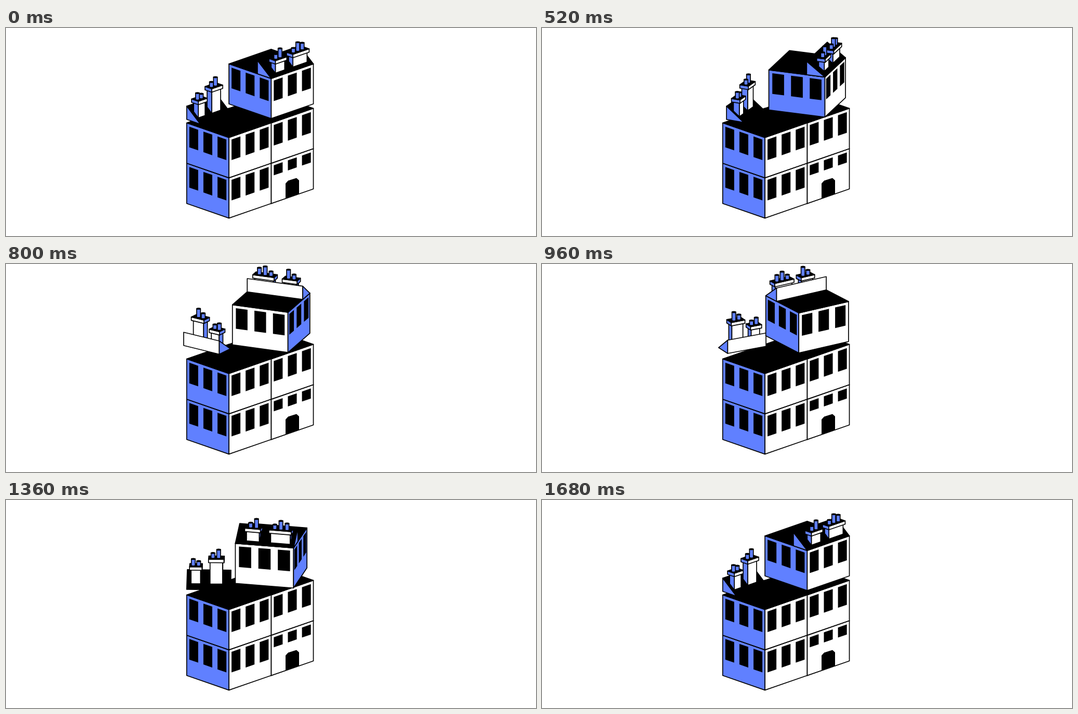
Write an HTML page with a canvas that moves like this. It is 1020 by 400 pixels and loops after 2200 ms.

```html
<!DOCTYPE html>
<html lang="en">
<head>
<meta charset="utf-8">
<title>Turning house</title>
<style>
html, body { margin: 0; height: 100%; overflow: hidden; background: #fff; }
canvas { display: block; }
</style>
</head>
<body>
<canvas id="stage" width="1020" height="400"></canvas>
<script>
const ctx = document.getElementById('stage').getContext('2d');
const BLUE = '#6080ff', WHITE = '#fff', BLACK = '#000';
const EDGE = 114.9, TILT = 0.3457, RIDGE = 25.5, CAP = 6.5;
const LOOP = 2200, STEP = 40, START = 320, SPAN = 1360;

// Keys: time, value, slope
const UPPER_TURN = [[0, 0, 0], [40, 0.8, 0.045], [360, 72, 0.335], [640, 168.6, 0.33],
  [840, 231.5, 0.33], [1040, 302, 0.31], [SPAN, 360, 0]];
const LOWER_LIFT = [[0, 0, 0], [360, 8, 0.013], [640, 10.8, 0], [840, 9.3, -0.013],
  [1040, 4.6, -0.022], [SPAN, 0, 0]];

// Chimneys: v range, cap height, pots as [v, height]
const UPPER_STACKS = [
  { v0: -0.35, v1: -0.08, z: 28.5, pots: [[-0.265, 37], [-0.165, 45]] },
  { v0: 0.065, v1: 0.45, z: 29, pots: [[0.15, 37], [0.255, 45], [0.36, 41]] }
];
const LOWER_STACKS = [
  { v0: -0.3, v1: -0.09, z: 40, pots: [[-0.24, 52], [-0.15, 48]] },
  { v0: 0.018, v1: 0.278, z: 55, pots: [[0.09, 64], [0.185, 70.5]] }
];

function track(keys, t) {
  let i = 1;
  while (i < keys.length - 1 && t > keys[i][0]) i++;
  const [t0, a, ma] = keys[i - 1], [t1, b, mb] = keys[i];
  const d = t1 - t0, s = Math.min(1, Math.max(0, (t - t0) / d)), q = 1 - s;
  return a * (1 + 2 * s) * q * q + b * s * s * (3 - 2 * s) + d * s * q * (ma * q - mb * s);
}

// Projects local (u, v, z) for an object standing at x, y and turned by deg
function view(x, y, deg) {
  const a = (45 + deg) * Math.PI / 180, sin = Math.sin(a), cos = Math.cos(a);
  return (u, v, z) => [
    x + EDGE * (u * sin + v * cos),
    y + EDGE * TILT * (u * cos - v * sin) - z
  ];
}

function facing(pts) {
  let area = 0;
  pts.forEach(([x, y], i) => {
    const [nx, ny] = pts[(i + 1) % pts.length];
    area += x * ny - nx * y;
  });
  return area > 0;
}

function face(pts, fill, line = true) {
  if (!facing(pts)) return;
  ctx.beginPath();
  pts.forEach(p => ctx.lineTo(p[0], p[1]));
  ctx.closePath();
  ctx.fillStyle = fill;
  ctx.fill();
  if (line) ctx.stroke();
}

function sides(u0, u1, v0, v1) {
  return [
    [u1, v0, u1, v1, WHITE],
    [u1, v1, u0, v1, BLUE],
    [u0, v1, u0, v0, WHITE],
    [u0, v0, u1, v0, BLUE]
  ];
}

function box(P, u0, u1, v0, v1, top, low) {
  for (const [a, b, c, d, fill] of sides(u0, u1, v0, v1)) {
    face([P(a, b, top), P(c, d, top), P(c, d, low(c)), P(a, b, low(a))], fill);
  }
  face([P(u0, v0, top), P(u0, v1, top), P(u1, v1, top), P(u1, v0, top)], BLACK);
}

function story(P, top, height, paneLow = 45.2) {
  box(P, -0.5, 0.5, -0.5, 0.5, top, () => top - height);
  for (const [a, b, c, d] of sides(-0.5, 0.5, -0.5, 0.5)) {
    const at = (s, z) => P(a + (c - a) * s, b + (d - b) * s, top - z);
    for (let i = 0; i < 3; i++) {
      const s = 0.062 + i * 0.334, e = s + 0.21;
      face([at(s, 5.6), at(e, 5.6), at(e, paneLow), at(s, paneLow)], BLACK, false);
    }
  }
}

function pot(P, u, v, base, top) {
  const [x, y] = P(u, v, top), bottom = P(u, v, base)[1], r = 3.7;
  ctx.beginPath();
  ctx.moveTo(x - r, y);
  ctx.lineTo(x - r, bottom);
  ctx.ellipse(x, bottom, r, 1.5, 0, Math.PI, 0, true);
  ctx.lineTo(x + r, y);
  ctx.closePath();
  ctx.fillStyle = BLUE;
  ctx.fill();
  ctx.stroke();
  ctx.beginPath();
  ctx.ellipse(x, y, 4.5, 1.9, 0, 0, Math.PI * 2);
  ctx.fillStyle = BLACK;
  ctx.fill();
}

function chimney(P, u0, u1, { v0, v1, z, pots }, foot) {
  const inset = 0.025, mid = (u0 + u1) / 2;
  box(P, u0 + inset, u1 - inset, v0 + inset, v1 - inset, z - CAP, foot);
  box(P, u0, u1, v0, v1, z, () => z - CAP);
  [...pots]
    .sort((a, b) => P(mid, a[0], 0)[1] - P(mid, b[0], 0)[1])
    .forEach(([v, top]) => pot(P, mid, v, z, top));
}

// Sloped roof piece with its chimneys
function gable(P, u0, u1, v0, v1, stacks, cap0, cap1) {
  const roof = [P(u0, v0, RIDGE), P(u0, v1, RIDGE), P(u1, v1, 0), P(u1, v0, 0)];
  const foot = u => RIDGE * (u1 - u) / (u1 - u0) - 2.5;
  const drawStacks = () => [...stacks]
    .sort((a, b) => P(0, a.v0 + a.v1, 0)[1] - P(0, b.v0 + b.v1, 0)[1])
    .forEach(s => chimney(P, cap0, cap1, s, foot));
  const inFront = facing(roof);

  if (!inFront) drawStacks();
  face(roof, BLACK);
  face([P(u0, v1, RIDGE), P(u0, v0, RIDGE), P(u0, v0, 0), P(u0, v1, 0)], WHITE);
  face([P(u0, v0, RIDGE), P(u1, v0, 0), P(u0, v0, 0)], BLUE);
  face([P(u0, v1, RIDGE), P(u0, v1, 0), P(u1, v1, 0)], BLUE);
  if (inFront) drawStacks();
}

function base() {
  const right = view(510.3, 154.5, 0), left = view(429, 182.5, 0);
  story(right, -77.5, 77.5, 25);
  story(right, 0, 77.5);
  face([[538, 327.5], [538, 299], [543, 293.5], [559, 288.5], [564, 293], [564, 318.5]], BLACK, false);
  story(left, -77.5, 77.5);
  story(left, 0, 77.5);
}

function draw(now) {
  const clock = Math.floor((now % LOOP) / STEP) * STEP;
  const t = Math.min(SPAN, Math.max(0, clock - START));
  const upperTurn = track(UPPER_TURN, t);
  const lowerTurn = 180 * (1 - Math.cos(Math.PI * t / SPAN));
  const upperLift = 2.5 * Math.sin(upperTurn * Math.PI / 360) ** 2;

  ctx.fillStyle = WHITE;
  ctx.fillRect(0, 0, 1020, 400);
  ctx.strokeStyle = BLACK;
  ctx.lineWidth = 1.7;
  ctx.lineJoin = 'round';

  base();

  const lower = view(388, 170.3 - track(LOWER_LIFT, t), lowerTurn);
  gable(lower, -0.15, 0.17, -0.345, 0.385, LOWER_STACKS, -0.08, 0.08);

  const upper = view(510.3, 69 - upperLift, upperTurn);
  story(upper, 0, 77);
  gable(upper, 0.175, 0.5, -0.5, 0.5, UPPER_STACKS, 0.3, 0.45);
}

let begin;
function tick(now) {
  if (begin === undefined) begin = now;
  draw(now - begin);
  requestAnimationFrame(tick);
}
draw(0);
requestAnimationFrame(tick);
</script>
</body>
</html>
```
